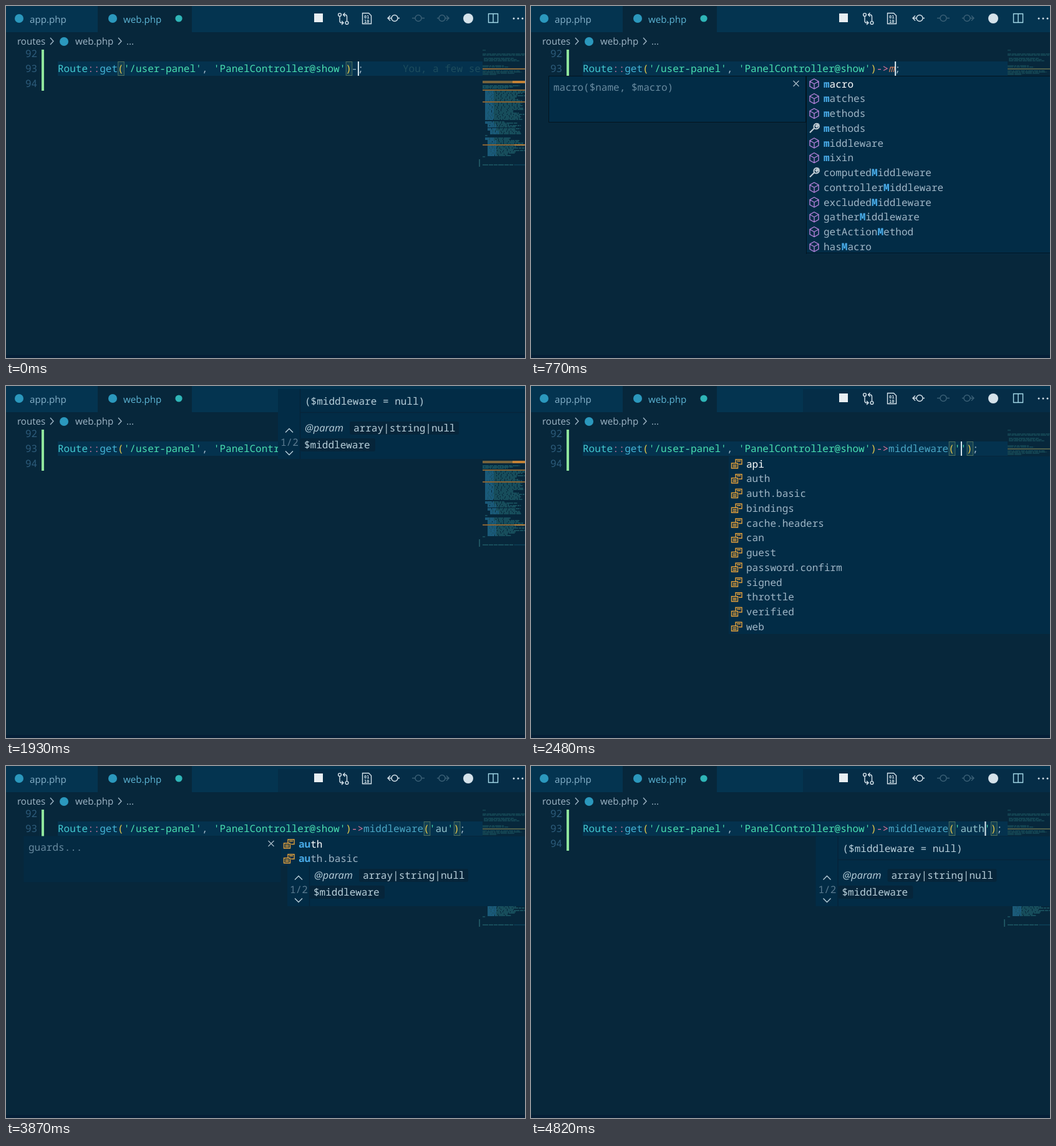
These frames come from a looping animation (832x565 px, 5050 ms). An HTML page:

```html
<!DOCTYPE html>
<html lang="en">
<head>
<meta charset="utf-8">
<title>Route editor</title>
<style>
html, body { margin: 0; width: 100%; height: 100%; overflow: hidden; background: #07273b; }
svg { display: block; width: 832px; height: 565px; }
text { white-space: pre; text-rendering: geometricPrecision; }
.mono { font: 16.03px "Noto Sans Mono", "DejaVu Sans Mono", monospace; }
.ui { font: 15.1px "Open Sans", "Noto Sans", sans-serif; }
.tag { font: italic 16.3px "Open Sans", "Noto Sans", sans-serif; }
.hit { font-weight: 700; fill: #49ace9; }
.line { fill: none; stroke-width: 1.4; }
</style>
</head>
<body>
<svg viewBox="0 0 832 565" xmlns="http://www.w3.org/2000/svg">
  <rect width="832" height="565" fill="#07273b"/>
  <rect y="560" width="832" height="5" fill="#051f37"/>
  <rect width="832" height="42" fill="#043450"/>
  <rect x="147" width="151" height="42" fill="#07273b"/>
  <rect id="shade" x="436" y="5" width="396" height="37" fill="#052d47"/>

  <g fill="#2b98bd">
    <circle cx="21" cy="20" r="7"/>
    <circle cx="171" cy="20" r="7"/>
    <circle cx="93" cy="57" r="7"/>
  </g>
  <circle cx="277" cy="20" r="5.6" fill="#2fb5b7"/>
  <g class="ui" fill="#9fb6c6">
    <text x="38" y="27" fill="#84b0c8">app.php</text>
    <text x="188" y="27" fill="#5cb4d4">web.php</text>
    <text x="18" y="62">routes</text>
    <text x="111" y="62">web.php</text>
    <text x="193" y="62">...</text>
  </g>
  <path class="line" stroke="#9fb6c6" d="M71 51l5 5.500-5 5.500M180 51l5 5.500-5 5.500"/>

  <g class="line" stroke="#d5e2ea">
    <rect x="494" y="12" width="14" height="14" fill="#e8eef2" stroke="none"/>
    <circle cx="535" cy="14" r="2.400"/><circle cx="546.500" cy="27" r="2.400"/>
    <path d="M535 17v7q0 3 3 3h3m-3-3l3 3-3 3M546.500 24v-7q0-3-3-3h-3m3-3l-3 3 3 3"/>
    <path d="M571.500 11.500h10l4 4v13h-14z"/>
    <circle cx="623" cy="19.500" r="5"/><path d="M628 19.500h3M618 19.500h-6m4-4l-4 4 4 4"/>
    <g stroke="#3b6076">
      <circle cx="661" cy="19.500" r="5"/><path d="M651 19.500h5M666 19.500h5"/>
      <circle cx="699" cy="19.500" r="5"/><path d="M691 19.500h3M704 19.500h6m-4-4l4 4-4 4"/>
    </g>
    <circle cx="741" cy="20" r="8" fill="#d5e2ea" stroke="none"/>
    <path stroke="#a5d9e8" d="M773.500 12.500h15v14h-15zM781 12.500v14"/>
  </g>
  <g fill="#d5e2ea">
    <circle cx="814" cy="20" r="1.500"/><circle cx="821" cy="20" r="1.500"/><circle cx="828" cy="20" r="1.500"/>
    <text style="font:700 7px 'DejaVu Sans Mono',monospace" x="574" y="20">01</text>
    <text style="font:700 7px 'DejaVu Sans Mono',monospace" x="574" y="27">10</text>
  </g>

  <rect x="83" y="89" width="681" height="23" fill="#04324e"/>
  <g class="mono" fill="#2d5c7b">
    <text x="31" y="82">92</text>
    <text x="31" y="106">93</text>
    <text x="31" y="129.500">94</text>
  </g>
  <rect x="57" y="70" width="4" height="66" fill="#8fe59c"/>
  <g id="map"></g>
  <g id="live"></g>
</svg>

<script>
const LOOP = 5050, CHAR = 9.618, LEFT = 83, ROW = 23.75;
const INK = '#9fb6c6', PANEL = '#022c46', EDGE = '#03141f';
const byId = id => document.getElementById(id);
const rect = (x, y, w, h, fill, more = '') =>
  `<rect x="${x}" y="${y}" width="${w}" height="${h}" fill="${fill}" ${more}/>`;
const path = (d, stroke, more = '') => `<path class="line" d="${d}" stroke="${stroke}" ${more}/>`;
const text = (x, y, body, fill = INK, cls = 'mono') =>
  `<text class="${cls}" x="${x}" y="${y}" fill="${fill}">${body}</text>`;
const span = (body, fill) => `<tspan fill="${fill}">${body.replace('>', '&gt;')}</tspan>`;
const colX = col => LEFT + col * CHAR;

// Popup contents; "~" marks a property, brackets mark matched letters.
const all = ['action', 'bind', 'bindingFieldFor', 'bindingFields', 'block', 'callable', 'compileRoute',
  'computedMiddleware', 'controllerDispatcher', 'controllerMiddleware', 'defaults', 'domain'];
const mids = ['~computedMiddleware', 'controllerMiddleware', 'excludedMiddleware', 'gatherMiddleware'];
const forM = ['macro', 'matches', 'methods', '~methods', 'middleware', 'mixin', ...mids,
  'getActionMethod', 'hasMacro'];
const tailMids = [...mids, 'withoutMiddleware'];
const forMi = ['middleware', 'mixin', ...tailMids, 'resolve[M]ethodDependenc[i]es'];
const forMid = ['middleware', ...tailMids, 'resolve[M]ethod[D]ependenc[i]es'];
const names = ['api', 'auth', 'auth.basic', 'bindings', 'cache.headers', 'can', 'guest',
  'password.confirm', 'signed', 'throttle', 'verified', 'web'];

const members = (items, query) => ({ items, query, x: 441 });
const values = (items, query, x) => ({ items, query, x, value: true });
const auths = values(names.slice(1, 3), 'au', 441);
const call = arg => `->middleware(${arg})`;
const midDocs = 'middleware([$middleware])';

// Each state holds until the next one begins.
const states = [
  { at: 0, tail: '-', first: true },
  { at: 80, tail: '->' },
  { at: 460, tail: '->', list: members(all, '') },
  { at: 540, tail: '->', list: members(all, ''), docs: 'action($action)' },
  { at: 770, tail: '->m', list: members(forM, 'm'), docs: 'macro($name, $macro)' },
  { at: 1090, tail: '->mi', list: members(forMi, 'mi'), docs: midDocs },
  { at: 1550, tail: '->mid', list: members(forMi, 'mi'), docs: midDocs },
  { at: 1630, tail: '->mid', list: members(forMid, 'mid'), docs: midDocs },
  { at: 1860, tail: call('') },
  { at: 1930, tail: call(''), hint: [0, 0] },
  { at: 2480, tail: call("''"), hint: [4, 108], list: values(names, '', 317) },
  { at: 2940, tail: call("''"), hint: [4, 108], list: values(names, '', 317), blink: true },
  { at: 3170, tail: call("'a'"), hint: [8, 108], list: values(names.slice(0, 3), 'a', 317) },
  { at: 3340, tail: call("'au'"), hint: [8, 108], list: values(names.slice(0, 3), 'a', 317) },
  { at: 3410, tail: call("'au'"), hint: [8, 108], list: auths, docs: 'guards...' },
  { at: 3570, tail: call("'au'"), hint: [15, 108], list: auths, docs: 'guards...' },
  { at: 3870, tail: call("'au'"), hint: [15, 108], list: auths, docs: 'guards...', blink: true },
  { at: 4420, tail: call("'au'"), hint: [15, 108], list: auths, docs: 'guards...' },
  { at: 4590, tail: call("'aut'"), hint: [15, 108], list: auths, docs: 'guards...' },
  { at: 4660, tail: call("'auth'"), hint: [15, 108], list: auths, docs: 'guards...' },
  { at: 4740, tail: call("'auth'"), hint: [15, 108] },
  { at: 4820, tail: call("'auth'"), hint: [20.500, 108] }
];

const bracketBox = col =>
  rect(colX(col) + .5, 89.5, CHAR, 22, '#123f52', 'stroke="#4c7062"');

function codeLine(s) {
  const start = 49, [, arrow, name, open, arg, close] = s.tail.match(/^(->?)(\w*)(\(?)([^)]*)(\)?)$/);
  const end = start + s.tail.length;
  const caret = end - (close ? (arg ? 2 : 1) : 0);
  const gold = '#e5c84b', green = '#49dfb0';
  const nameInk = open ? '#4aa6c4' : name.length === 1 ? '#d67e5c' : '#c0b8a6';
  let out = '';
  if (s.first) out += bracketBox(10) + bracketBox(48);
  if (open) out += bracketBox(61) + bracketBox(end - 1);
  const tail = span(arrow, s.first ? '#8fb0c0' : '#df769b') +
    `<tspan fill="${nameInk}" ${open ? '' : 'font-style="italic"'}>${name}</tspan>` +
    span(open, gold) +
    (arg ? span("'", green) + span(arg.slice(1, -1), '#93c3cc') + span("'", green) : '') +
    span(close, gold);
  out += text(LEFT, 106, span('Route', '#43c9d0') + span('::', '#b87397') + span('get', '#45b4d6') +
    span('(', gold) + span("'/user-panel'", green) + ', ' + span("'PanelController@show'", green) +
    span(')', gold) + tail + ';');
  if (s.first) out += text(636, 106, 'You, a few se', '#1d4c5d');
  if (!s.blink) out += rect(colX(caret), 89, 2, 23, '#dceaf0');
  return out;
}

function signature([dx, dy]) {
  const ink = '#b8cfda', chip = '#06253a';
  return `<g transform="translate(${dx} ${dy})">` +
    rect(436, 5, 420, 112, PANEL) +
    path('M471.5 5v112M472 42.500h384', '#06243a') +
    rect(551, 57, 175, 21, chip, 'rx="3"') + rect(472, 84, 120, 21, chip, 'rx="3"') +
    path('M448 74.500l6-6 6 6M448 104.500l6 6 6-6', ink) +
    text(440, 96, '1/2', '#5b7b90') +
    text(479, 30, '($middleware = null)', ink) +
    text(479, 73, '@param', ink, 'tag') +
    text(557, 73, 'array|string|null', ink) +
    text(478, 100, '$middleware', ink) + '</g>';
}

const cube = path('M0-8L7-4V4L0 8L-7 4V-4ZM-7-4L0 0L7-4M0 0V8', '#b180d7');
const wrench = path('M-7 7L0 0M0 0C-2-5 2-9 6-7L2.500-3.500L4-2L7.500-5.500C9-1 5 3 0 0', '#c3ced6',
  'style="stroke-width:2"');
const pair = path('M-2-1.500V-7H8V0.500H3M0-4.500H6M-8.500-1H1.500V7H-8.500ZM-6.500 2H-.5M-6.500 4.500H-.5',
  '#e3a03c');

function mark(name, query) {
  const cap = query && query[0].toUpperCase() + query.slice(1);
  const found = query && (name.startsWith(query) ? query : name.includes(cap) && cap);
  const marked = found && !name.includes('[') ? name.replace(found, '[$&]') : name;
  return marked.replace(/\[/g, '<tspan class="hit">').replace(/\]/g, '</tspan>');
}

function popup({ items, query, x, value }) {
  const h = items.length * ROW;
  let out = rect(x, 113, 832 - x, Math.floor(h), PANEL);
  if (!value) {
    out += path(`M${x + .5} 112v${h + 1}M${x} 112.500H832`, EDGE, 'style="stroke-width:1"');
    if (items.length === 12) out += path(`M${x} 396.500H832`, EDGE, 'style="stroke-width:1"');
  }
  items.forEach((item, i) => {
    const y = 125 + i * ROW, prop = item[0] === '~';
    const icon = value ? pair : prop ? wrench : cube;
    out += `<g transform="translate(${x + 13} ${y})">${icon}</g>`;
    out += text(x + 28, y + 5.6, mark(prop ? item.slice(1) : item, query), i ? INK : '#fff');
  });
  return out;
}

function docsBox(body, framed) {
  return rect(28.5, 112.5, 412, 74, framed ? PANEL : '#042a42', framed ? `stroke="${EDGE}"` : '') +
    text(36, 135.5, body, '#688a9f') +
    path('M420.500 120l9 9M429.500 120l-9 9', '#a9bcc8', 'style="stroke-width:1.200"');
}

function buildMap() {
  let seed = 11, out = '';
  const rnd = () => (seed = (seed * 16807) % 2147483647) / 2147483647;
  const row = (x, y, w, ink) => {
    const dash = Array.from({ length: 6 }, (_, i) => i % 2 ? 1 : 3 + Math.floor(rnd() * 9)).join(' ');
    out += path(`M${x} ${y}h${Math.min(w, 832 - x)}`, ink, `stroke-dasharray="${dash}"`);
  };
  // Blocks: first y, last y, indent, least width, spread
  [[71, 71, 0, 5, 1], [77, 79, 0, 66, 2], [84, 88, 2, 45, 20], [96, 98, 0, 25, 30],
   [104, 110, 0, 15, 50], [128, 132, 0, 30, 30], [136, 183, 4, 45, 19], [186, 188, 4, 25, 30],
   [190, 194, 8, 30, 30], [197, 199, 8, 35, 20], [201, 206, 12, 35, 20], [208, 208, 4, 3, 1],
   [212, 214, 4, 30, 30], [216, 234, 8, 40, 20], [236, 240, 8, 30, 30], [242, 242, 0, 4, 1],
   [255, 255, 0, 50, 2]].forEach(([a, b, indent, least, spread]) => {
    for (let y = a; y <= b; y += 2) {
      row(764 + indent, y, least + rnd() * spread, y < 112 ? '#164957' : '#1d5966');
      if (a > 130 && b > a) row(764 + indent, y, 14, '#1c5f84');
    }
  });
  [134, 153, 222].forEach(y => out += rect(764, y, 68, 2, '#866334'));
  out += rect(764, 120, 68, 4, '#77633c') + rect(812, 120, 20, 4, '#c48236');
  out += rect(815, 222, 17, 2, '#b57a35') + rect(815, 254, 17, 2, '#0b3a50');
  out += rect(758, 246, 2, 12, '#1e5360');
  byId('map').innerHTML = out;
}

let shown = null;
function draw(time) {
  const state = states.filter(s => s.at <= time).pop();
  if (state === shown) return;
  shown = state;
  byId('shade').style.display = state.at >= 2480 ? '' : 'none';
  byId('live').innerHTML = rect(764, 100, 68, 2, state.first ? '#8d6b3c' : '#4f5e4a') + codeLine(state) +
    (state.hint ? signature(state.hint) : '') +
    (state.docs ? docsBox(state.docs, !state.list.value) : '') +
    (state.list ? popup(state.list) : '');
}

buildMap();
const begun = performance.now();
function tick() {
  draw((performance.now() - begun) % LOOP);
  requestAnimationFrame(tick);
}
tick();
</script>
</body>
</html>
```
